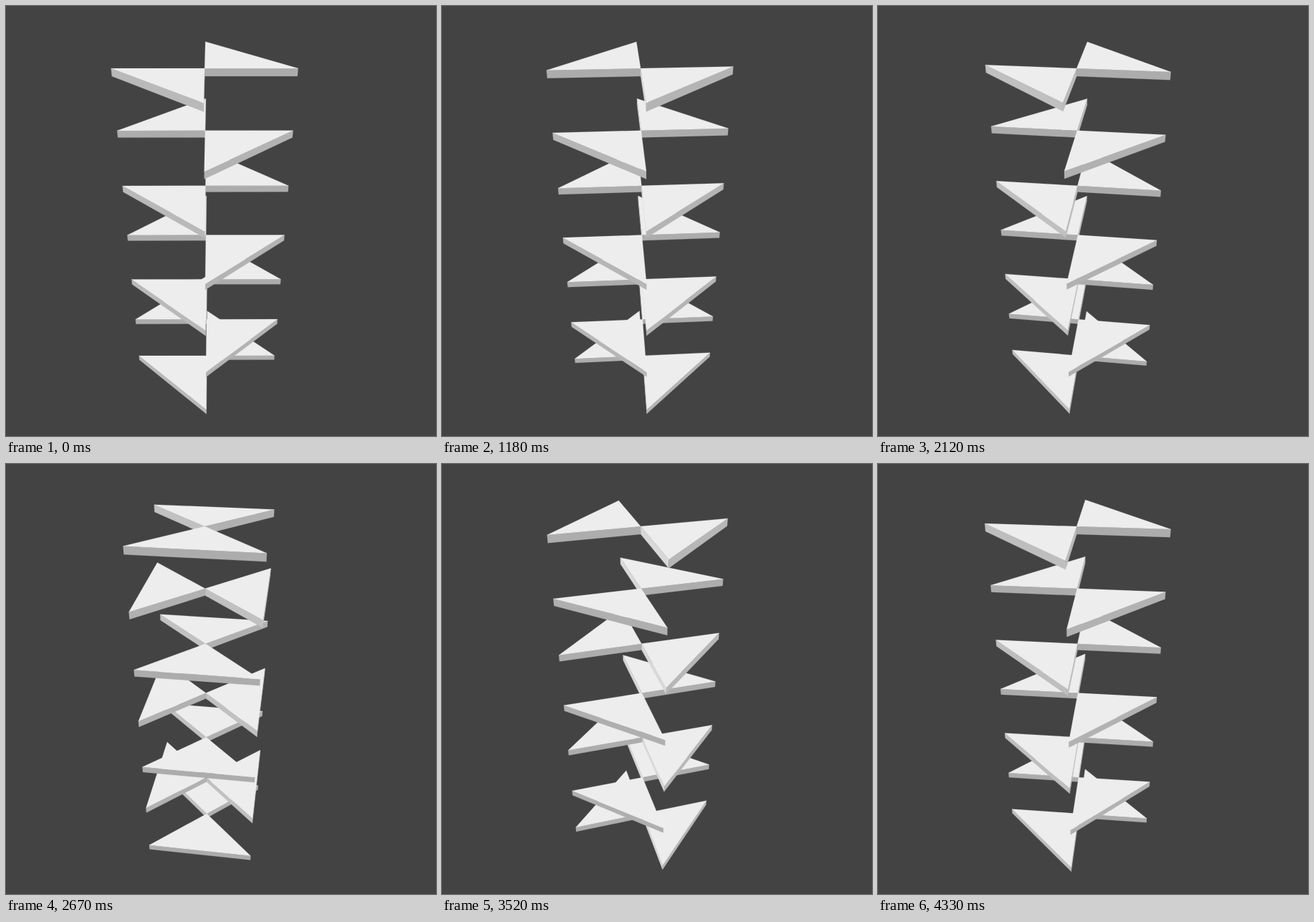
Animation, 600 px wide and 600 px high, one loop 4.36 s. Source, as an HTML page:

```html
<!DOCTYPE html>
<html lang="en">
<head>
<meta charset="utf-8">
<title>Turning stack</title>
<style>
  html, body { margin: 0; width: 100%; height: 100%; overflow: hidden; background: #434343; }
  svg { display: block; width: 100%; height: 100%; }
  polygon { stroke-width: .2; stroke-linejoin: round; }
</style>
</head>
<body>
<svg id="stage" viewBox="0 0 600 600"></svg>
<script>
const LOOP = 4360;
const LEVELS = 7;
const THICKNESS = 0.12;
const START_ANGLE = 0.1;
const STEP_ANGLE = 360 / 131;
const TOP_COLOR = '#ededed';
const stage = document.getElementById('stage');
const rad = deg => deg * Math.PI / 180;

// x runs right, z away from the viewer, level downwards; one unit is a slab's leg.
function project([x, z], level) {
  const depth = 0.007663 + 0.000487 * level + 0.001 * z;
  return [
    288 + (x - 0.083) / depth,
    300 + (-1.632 + 0.6035 * level - 0.535 * z) / depth
  ];
}

// Ten steps per third of a second; the first step of each group is held twice as long.
function stepAt(t) {
  const cycle = 1000 / 3;
  const shifted = t - 120;
  const group = Math.floor(shifted / cycle);
  const within = Math.floor((shifted - group * cycle - 28) / 30);
  return Math.max(0, 3 + 10 * group + Math.min(10, Math.max(0, within)));
}

function polygon(points, color) {
  const list = points.map(p => p.map(v => v.toFixed(2)).join()).join(' ');
  return `<polygon points="${list}" fill="${color}" stroke="${color}"/>`;
}

// Light comes from the left, so steep left-facing sides are brightest.
function sideColor(normalX) {
  const glow = normalX < 0 ? 52 * normalX ** 4 : 14 * normalX ** 2;
  const v = Math.round(172 + glow);
  return `rgb(${v},${v},${v})`;
}

function slab(angle, level) {
  const corner = deg => [Math.cos(rad(deg)), Math.sin(rad(deg))];
  const corners = [[0, 0], corner(angle), corner(angle + 90)];
  const top = corners.map(p => project(p, level));
  const bottom = corners.map(p => project(p, level + THICKNESS));
  let faces = '';
  corners.forEach((p, i) => {
    const j = (i + 1) % 3;
    const [a, b, c] = [top[i], top[j], bottom[j]];
    const facing = (b[0] - a[0]) * (c[1] - b[1]) - (b[1] - a[1]) * (c[0] - b[0]);
    if (facing <= 0) return;
    const dx = corners[j][0] - p[0], dz = corners[j][1] - p[1];
    faces += polygon([a, b, c, bottom[i]], sideColor(dz / Math.hypot(dx, dz)));
  });
  return faces + polygon(top, TOP_COLOR);
}

function render(t) {
  const turn = START_ANGLE + STEP_ANGLE * stepAt(t);
  let picture = '';
  for (let level = LEVELS - 1; level >= 0; level--) {
    const angle = turn + 90 * (level % 2);
    const distance = a => Math.sin(rad(a + 45));
    [angle, angle + 180]
      .sort((a, b) => distance(b) - distance(a))
      .forEach(a => { picture += slab(a, level); });
  }
  stage.innerHTML = picture;
}

const began = performance.now();
function tick() {
  render((performance.now() - began) % LOOP);
  requestAnimationFrame(tick);
}
tick();
</script>
</body>
</html>
```
